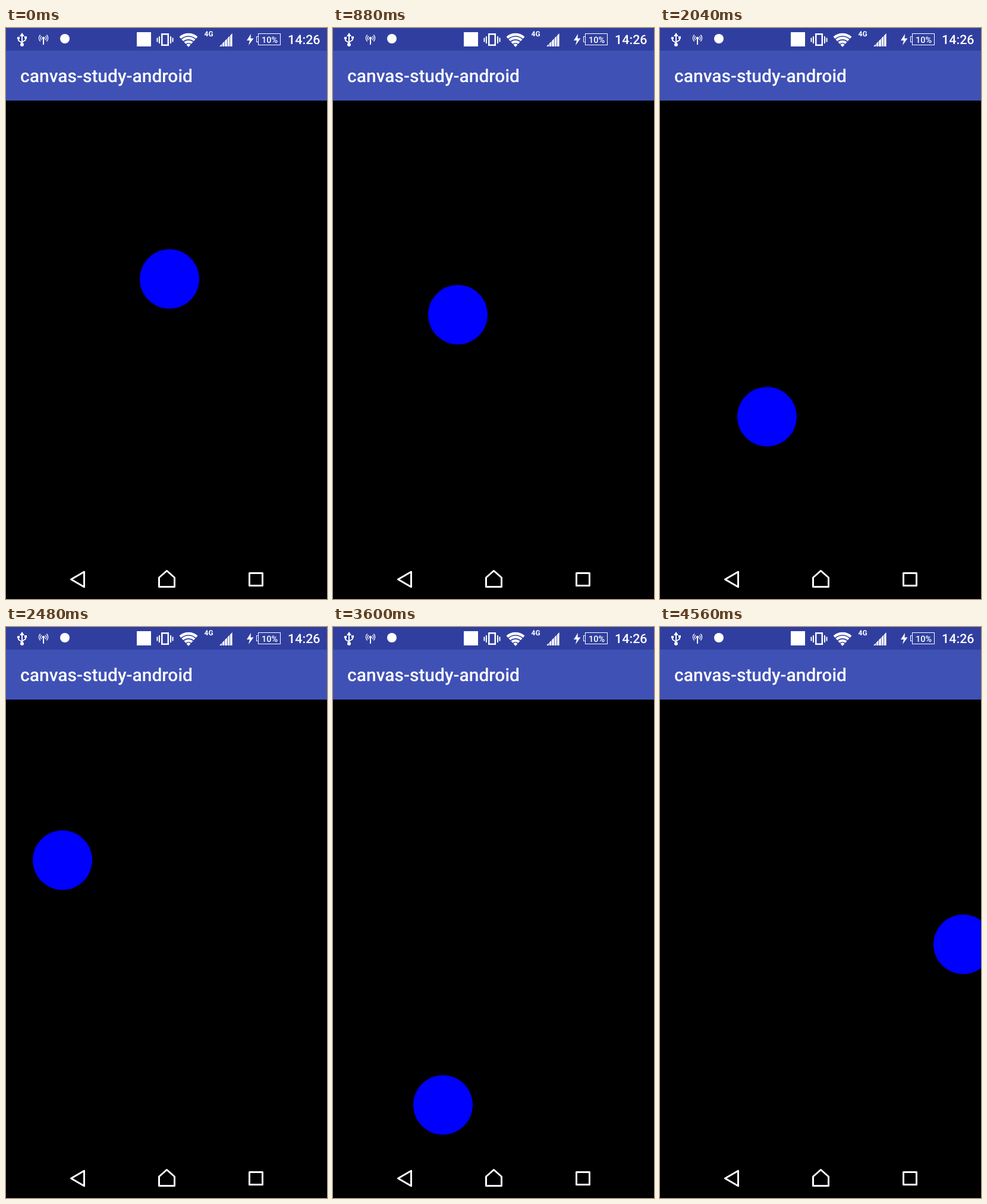
An HTML page with a canvas that plays this animation: 540 px wide and 960 px high, repeating every 4.6 s.

```html
<!DOCTYPE html>
<html lang="en">
<head>
<meta charset="utf-8">
<title>canvas-study-android</title>
<style>
  html, body { margin: 0; width: 100%; height: 100%; overflow: hidden; background: #000; }
  canvas { display: block; }
</style>
</head>
<body>
<canvas id="stage" width="540" height="960"></canvas>
<script>
const ctx = document.getElementById('stage').getContext('2d');
const LOOP = 4600, STEP = 40;
const UPDATES_PER_STEP = 2.4; // 60 updates a second
const WIDTH = 540, TOP = 121.5, BOTTOM = 888;
const RADIUS = 50, SPEED = 30;

// Three updates are lost while the motion settles in.
function updatesAt(step) {
  const lost = Math.round(3 * (1 - Math.exp(-step / 25)));
  return Math.floor(step * UPDATES_PER_STEP + 0.7) - lost;
}

// Runs up from 0, is clamped to max, then runs down and is clamped to 0.
function bounce(n, max) {
  const up = Math.ceil(max / SPEED);
  const p = n % (2 * up - 1);
  return p < up ? p * SPEED : max - (p - up) * SPEED;
}

function path(points, closed) {
  ctx.beginPath();
  points.forEach(([x, y]) => ctx.lineTo(x, y));
  if (closed) ctx.closePath();
}

function line(points, width, closed = false) {
  path(points, closed);
  ctx.lineWidth = width;
  ctx.stroke();
}

function shape(points) {
  path(points, true);
  ctx.fill();
}

function box(x, y, w, h, width) {
  ctx.lineWidth = width;
  ctx.strokeRect(x, y, w, h);
}

function disc(x, y, r) {
  ctx.beginPath();
  ctx.arc(x, y, r, 0, 2 * Math.PI);
  ctx.fill();
}

function arc(x, y, r, angle, spread, width) {
  ctx.beginPath();
  ctx.arc(x, y, r, angle - spread, angle + spread);
  ctx.lineWidth = width;
  ctx.stroke();
}

function label(text, x, y, size, weight = 500) {
  ctx.font = `${weight} ${size}px Roboto, sans-serif`;
  ctx.fillText(text, x, y);
}

function setInk(color) {
  ctx.fillStyle = ctx.strokeStyle = color;
}

function drawUsb() {
  line([[27, 12], [27, 27]], 2);
  shape([[27, 8], [31, 14], [23, 14]]);
  disc(27, 28, 3);
  disc(21, 17, 2.3);
  line([[21, 17], [21, 21], [27, 25]], 1.8);
  ctx.fillRect(31, 14, 4, 4);
  line([[33, 17], [33, 20], [27, 24]], 1.8);
}

function drawAntenna() {
  disc(63, 17, 2.3);
  line([[63, 17], [63, 28]], 2);
  for (const angle of [0, Math.PI]) {
    arc(63, 17, 4.7, angle, 0.8, 1.3);
    arc(63, 17, 7.6, angle, 0.8, 1.3);
  }
}

function drawVibrate() {
  box(262.3, 10.3, 10.5, 18.5, 2.5);
  for (const side of [-1, 1]) {
    ctx.fillRect(266.5 + side * 9.5, 14, 2, 12);
    ctx.fillRect(266.5 + side * 13, 16.5, 2, 7);
  }
}

function drawWifi() {
  const up = -Math.PI / 2;
  for (let i = 0; i < 3; i++) arc(307, 32, 21 - i * 5.9, up, 0.73, 4.3);
  arc(307, 32, 2.7, up, 0.73, 5.4);
}

function drawSignal() {
  for (let i = 0; i < 5; i++) {
    const x = 359.5 + i * 4.4, right = x + 3.5;
    const slope = px => 31 - (px - 359) * 1.02;
    shape([[x, 31], [x, slope(x)], [right, slope(right)], [right, 31]]);
  }
}

function drawBattery() {
  shape([[412, 10], [405, 21], [410, 21], [408, 29], [416.5, 17.5], [411.5, 17.5]]);
  box(424.5, 9.5, 37, 19, 1);
  box(421.5, 14.5, 3, 9, 1);
  label('10%', 430, 25, 14.5);
}

function drawBars() {
  ctx.fillStyle = '#303f9f';
  ctx.fillRect(0, 0, WIDTH, 38);
  ctx.fillStyle = '#3f51b5';
  ctx.fillRect(0, 38, WIDTH, 84);

  setInk('#fff');
  drawUsb();
  drawAntenna();
  disc(99, 18, 8);
  ctx.fillRect(220, 7, 24, 24);
  drawVibrate();
  drawWifi();
  label('4G', 333.5, 14, 12, 700);
  drawSignal();
  drawBattery();
  label('14:26', 474, 27, 21.5);
  label('canvas-study-android', 24, 91, 30);
}

function drawNavigation() {
  setInk('#fff');
  ctx.lineJoin = 'round';
  line([[109.5, 927], [131.5, 914.3], [131.5, 939.7]], 3, true);
  line([[257.5, 939.5], [257.5, 924], [270.5, 912.5], [283.5, 924], [283.5, 939.5]], 3, true);
  box(409.5, 916.5, 22, 21, 3);
  ctx.lineJoin = 'miter';
}

function drawBall(step) {
  const n = updatesAt(step);
  const x = bounce(n + 26, WIDTH - RADIUS / 2);
  const y = TOP + bounce(n + 10, BOTTOM - TOP - RADIUS / 2);
  ctx.fillStyle = '#00f';
  disc(x, y + 0.5, RADIUS);
}

function frame() {
  const step = Math.floor(performance.now() % LOOP / STEP);
  ctx.fillStyle = '#000';
  ctx.fillRect(0, 0, WIDTH, 960);
  drawBall(step);
  ctx.fillStyle = '#000';
  ctx.fillRect(0, BOTTOM, WIDTH, 960 - BOTTOM);
  drawBars();
  drawNavigation();
  requestAnimationFrame(frame);
}

ctx.textRendering = 'geometricPrecision';
frame();
</script>
</body>
</html>
```
